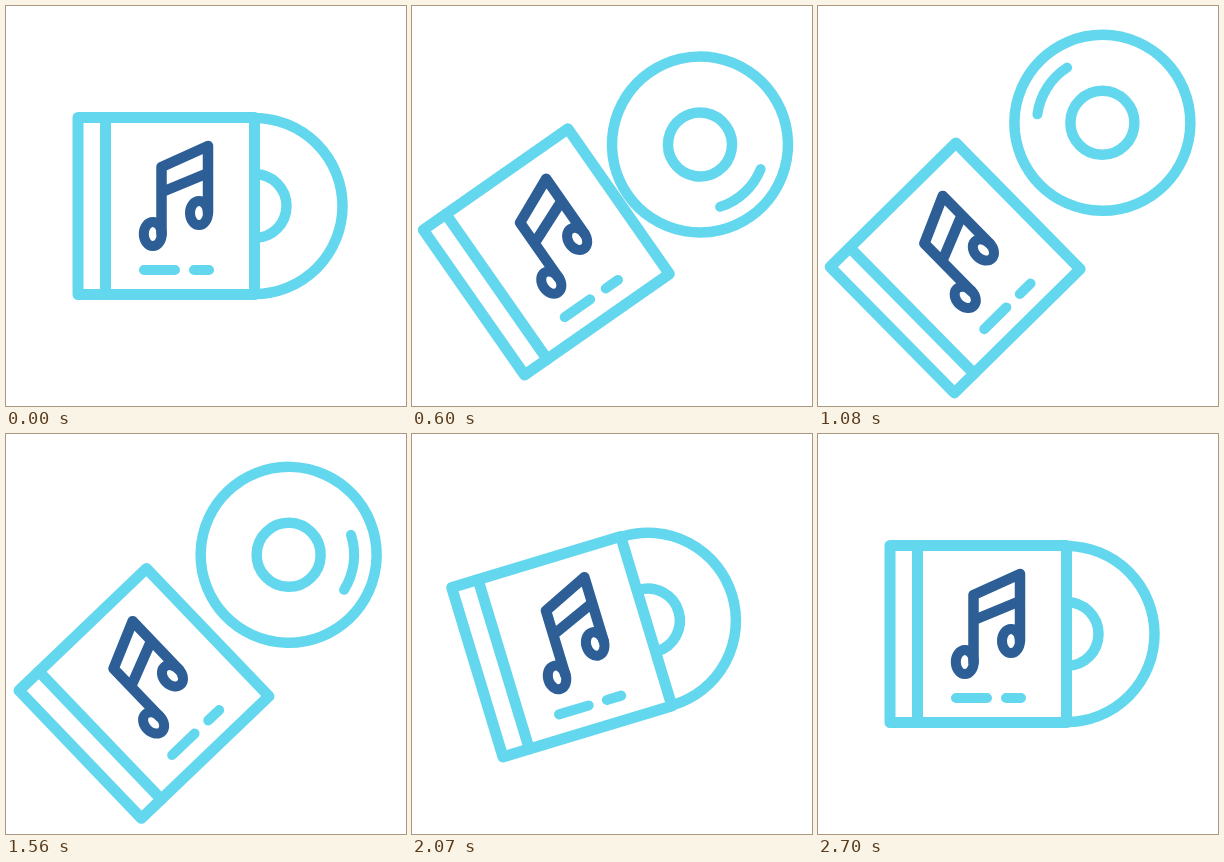
An HTML page with a canvas for the animation above (2.73 s loop, 400x400 px).

```html
<!DOCTYPE html>
<html lang="en">
<head>
<meta charset="utf-8">
<title>Music disc</title>
<style>
  html, body { margin: 0; width: 100%; height: 100%; overflow: hidden; background: #fff; }
  canvas { display: block; width: 100vmin; height: 100vmin; }
</style>
</head>
<body>
<canvas id="stage" width="400" height="400"></canvas>
<script>
const ctx = document.getElementById('stage').getContext('2d');
const LOOP = 2730, STEP = 30;
const CYAN = '#63d7ed', NAVY = '#2d5f96';
const RAD = Math.PI / 180;

const progress = (t, from, to) => Math.min(1, Math.max(0, (t - from) / (to - from)));

// cubic-bezier(.25, .1, .25, 1), solved by bisection
function ease(x) {
  let lo = 0, hi = 1;
  for (let i = 0; i < 24; i++) {
    const s = (lo + hi) / 2;
    if (0.75 * s * (1 - s) + s ** 3 < x) lo = s; else hi = s;
  }
  const s = lo, r = 1 - s;
  return 0.3 * s * r * r + 3 * r * s * s + s ** 3;
}

// Eases up, rests, then plays the same curve backwards
function outAndBack(t, outEnd, backStart, backEnd) {
  return t < backStart
    ? ease(progress(t, 30, outEnd))
    : ease(1 - progress(t, backStart, backEnd));
}

const SPIN = [[0, -134], [360, -8], [600, 82], [1080, 257], [1560, 411], [2100, 586]];

function spinAt(t) {
  for (let i = 1; i < SPIN.length; i++) {
    const [t0, a0] = SPIN[i - 1], [t1, a1] = SPIN[i];
    if (t <= t1) return a0 + (a1 - a0) * progress(t, t0, t1);
  }
  return SPIN[SPIN.length - 1][1];
}

function pose(t) {
  const settle = 2070;
  const tiltAt = u => 45 * outAndBack(u, 1230, 1365, 2286);
  const slideAt = u => 48.5 * outAndBack(u, 1100, 1300, 2245);
  let tilt = tiltAt(t), slide = slideAt(t);
  if (t > settle) {
    const p = progress(t, settle, 2330);
    tilt = tiltAt(settle) * (1 - progress(t, settle, 2287)) ** 2;
    slide = slideAt(settle) * (1 - p * p * (3 - 2 * p));
  }
  return {
    tilt, slide,
    lift: -4 * Math.sin(Math.PI * progress(t, 2000, 2330)),
    eject: 118.5 * outAndBack(t, 1090, 1345, 2090),
    spin: spinAt(t)
  };
}

function stroke(color, width, ...lines) {
  ctx.strokeStyle = color;
  ctx.lineWidth = width;
  ctx.beginPath();
  for (const [x, y, ...rest] of lines) {
    ctx.moveTo(x, y);
    for (let i = 0; i < rest.length; i += 2) ctx.lineTo(rest[i], rest[i + 1]);
  }
  ctx.stroke();
}

function arc(x, y, rx, ry, from = 0, to = 360) {
  ctx.beginPath();
  ctx.ellipse(x, y, rx, ry, 0, from * RAD, to * RAD);
  ctx.stroke();
}

function drawDisc(x, spin) {
  ctx.strokeStyle = CYAN;
  ctx.lineWidth = 10.5;
  arc(x, 200, 88, 88);
  arc(x, 200, 32, 32);
  ctx.lineWidth = 10;
  arc(x, 200, 65.5, 65.5, spin - 25, spin + 25);
}

function drawCase() {
  ctx.fillStyle = '#fff';
  ctx.strokeStyle = CYAN;
  ctx.lineWidth = 11;
  ctx.beginPath();
  ctx.rect(72, 111.5, 176.5, 177);
  ctx.fill();
  ctx.stroke();
  stroke(CYAN, 11, [99.5, 111.5, 99.5, 288.5]);
  stroke(CYAN, 10, [138, 264, 169, 264], [188, 264, 203, 264]);
  stroke(NAVY, 10.5,
    [155.5, 228, 155.5, 161, 202, 140, 202, 207],
    [156, 186, 202, 167]);
  ctx.lineWidth = 10;
  arc(146.8, 228, 9, 12);
  arc(193, 207, 9, 12);
}

function render(t) {
  const { tilt, slide, lift, eject, spin } = pose(t);
  ctx.fillStyle = '#fff';
  ctx.fillRect(0, 0, 400, 400);
  ctx.lineCap = ctx.lineJoin = 'round';
  ctx.save();
  ctx.translate(200, 200 + lift);
  ctx.rotate(-tilt * RAD);
  ctx.translate(-200 - slide, -200);
  drawDisc(248.5 + eject, spin);
  drawCase();
  ctx.restore();
}

const start = performance.now();
function frame() {
  const t = (performance.now() - start) % LOOP;
  render(Math.floor(t / STEP) * STEP);
  requestAnimationFrame(frame);
}
frame();
</script>
</body>
</html>
```
